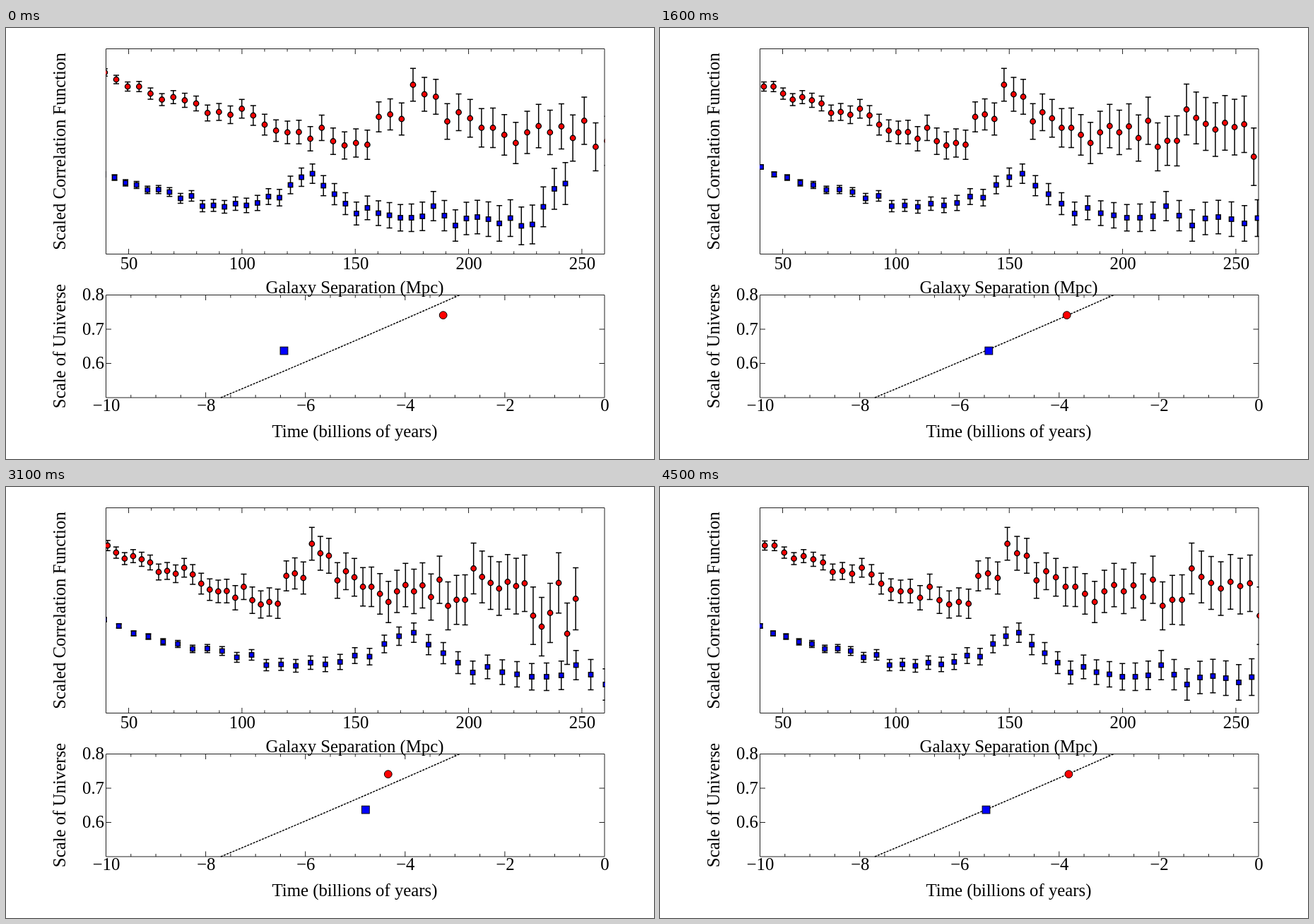
An HTML page that plays this animation: 917 by 611 pixels, repeating every 4600 ms.

```html
<!DOCTYPE html>
<html lang="en">
<head>
<meta charset="utf-8">
<title>Scale of Universe</title>
<style>
  html, body { margin: 0; width: 100%; height: 100%; overflow: hidden; background: #fff; }
  svg { display: block; width: 917px; height: 611px; }
  text { font: 24.8px "Liberation Serif", "Times New Roman", serif; text-anchor: middle; fill: #000; }
  .axis { fill: none; stroke: #222; stroke-width: 1; }
  .bar { fill: none; stroke: #000; stroke-width: 1.5; }
  .red { fill: #f00; }
  .blue { fill: #00f; }
  .dot { stroke: #000; stroke-width: 1.4; }
  .big { stroke: #000; stroke-width: 1; }
  .model { fill: none; stroke: #000; stroke-width: 1.5; stroke-dasharray: 3 1.5; }
</style>
</head>
<body>
<svg id="stage" viewBox="0 0 917 611">
  <clipPath id="plot"><rect x="141" y="29" width="706.5" height="292"/></clipPath>
</svg>
<script>
const LEFT = 141.5, RIGHT = 847;
const TOP_PLOT = { top: 29.5, bottom: 320.5 };
const LOW_PLOT = { top: 378.5, bottom: 524 };
const FRAME_MS = 100, FRAMES = 46, TURN = 30;

const separationX = mpc => LEFT + (mpc - 40) * (RIGHT - LEFT) / 220;
const timeX = gyr => RIGHT + gyr * (RIGHT - LEFT) / 10;
const scaleY = a => LOW_PLOT.top + (0.8 - a) * 485;
const ORIGIN = separationX(0);

const series = [
  {
    shape: 'circle', color: 'red', first: 7, offset: 0.84, step: 13.73,
    stretch: f => 1 / f,
    error: bin => 0.67 * bin,
    timeSpan: 268.6, scale: 0.741,
    ys: [63, 73, 83, 83, 93, 101.5, 98, 102.5, 107, 120.5, 119, 123, 114.5, 124, 137,
      145.5, 148, 147.5, 157, 141.5, 160.5, 166.5, 163, 165.5, 126, 122.5, 129, 80.5, 94, 97.5,
      132.5, 119.5, 128, 141.5, 141.5, 151.5, 163, 148, 139, 148, 139.5, 156, 131.5, 168.5, 160,
      160, 115.5, 127.5, 136, 144, 134.5, 140.5, 136.5, 182.5, 198, 178.5, 136, 208, 158.5]
  },
  {
    shape: 'rect', color: 'blue', first: 6, offset: 0.02, step: 18.306,
    stretch: f => f,
    error: bin => bin * (0.4 + 0.0039 * bin),
    timeSpan: 385.5, scale: 0.637,
    ys: [188, 197, 207.5, 212, 219.5, 222.5, 229.5, 229, 232.5, 241.5, 238, 252.5, 251.5, 253.5, 249,
      251.5, 248, 239, 240.5, 222.5, 211.5, 206.5, 223.5, 235.5, 249, 263, 255, 262.5, 265.5, 269,
      269, 267, 252.5, 266, 280, 270, 268, 271, 277, 269.5, 280.5, 278.5, 253.5, 228, 220.5]
  }
];

const svg = document.getElementById('stage');

function add(parent, tag, attrs, content) {
  const node = document.createElementNS('http://www.w3.org/2000/svg', tag);
  for (const key in attrs) node.setAttribute(key, attrs[key]);
  if (content) node.textContent = content;
  parent.appendChild(node);
  return node;
}

function marker(parent, shape, y, radius, className) {
  return add(parent, shape, shape === 'circle'
    ? { cy: y, r: radius, class: className }
    : { x: -radius, y: y - radius, width: 2 * radius, height: 2 * radius, class: className });
}

const label = (x, y, text) => add(svg, 'text', { x, y }, text);
const sideLabel = (y, text) => add(svg, 'text', { transform: `translate(84 ${y}) rotate(-90)` }, text);
const place = (node, x) => node.setAttribute('transform', `translate(${x.toFixed(2)} 0)`);

function frame({ top, bottom }, xs, isMajor) {
  let path = `M${LEFT} ${top}H${RIGHT}V${bottom}H${LEFT}Z`;
  xs.forEach(([value, x]) => {
    const length = isMajor(value) ? 7.5 : 4;
    path += `M${x} ${top}v${length}M${x} ${bottom}v${-length}`;
  });
  return path;
}

function drawAxes() {
  const separations = Array.from({ length: 21 }, (_, i) => [50 + 10 * i, separationX(50 + 10 * i)]);
  const times = Array.from({ length: 19 }, (_, i) => [-9.5 + i / 2, timeX(-9.5 + i / 2)]);
  let path = frame(TOP_PLOT, separations, v => v % 50 === 0) + frame(LOW_PLOT, times, v => v % 2 === 0);
  for (const a of [0.7, 0.6]) path += `M${LEFT} ${scaleY(a)}h7.5M${RIGHT} ${scaleY(a)}h-7.5`;
  add(svg, 'path', { d: path, class: 'axis' });

  for (let v = 50; v <= 250; v += 50) label(separationX(v) + 0.5, 341.5, String(v));
  for (let v = -10; v <= 0; v += 2) label(timeX(v) + 0.5, 543, String(v).replace('-', '\u2212'));
  for (const a of [0.8, 0.7, 0.6]) label(123.5, scaleY(a) + 7.5, a.toFixed(1));
  label(493.5, 376, 'Galaxy Separation (Mpc)');
  label(493.5, 580, 'Time (billions of years)');
  sideLabel(175, 'Scaled Correlation Function');
  sideLabel(451, 'Scale of Universe');
}

function drawSeries(s) {
  const group = add(svg, 'g', { 'clip-path': 'url(#plot)' });
  s.points = s.ys.map((y, i) => {
    const bin = s.first + i + s.offset;
    const e = s.error(bin);
    const node = add(group, 'g', {});
    add(node, 'path', { d: `M0 ${y - e}V${y + e}M-4 ${y - e}h8M-4 ${y + e}h8`, class: 'bar' });
    marker(node, s.shape, y, s.shape === 'circle' ? 3.7 : 3.2, `dot ${s.color}`);
    return { node, distance: bin * s.step };
  });
  s.epoch = marker(svg, s.shape, scaleY(s.scale), 5.4, `big ${s.color}`);
}

// One expansion factor drives both panels: it sweeps up, then back to 1.
function render(ms) {
  const index = Math.floor(ms / FRAME_MS) % FRAMES;
  const factor = 0.85 + 0.01 * (TURN - Math.abs(TURN - index));
  for (const s of series) {
    const stretch = s.stretch(factor);
    for (const p of s.points) place(p.node, ORIGIN + p.distance * stretch);
    place(s.epoch, RIGHT - s.timeSpan / stretch);
  }
}

drawAxes();
add(svg, 'path', { d: 'M304 524Q473 453.4 642 378.5', class: 'model' });
series.forEach(drawSeries);

const start = performance.now();
function tick() {
  render(performance.now() - start);
  requestAnimationFrame(tick);
}
tick();
</script>
</body>
</html>
```
